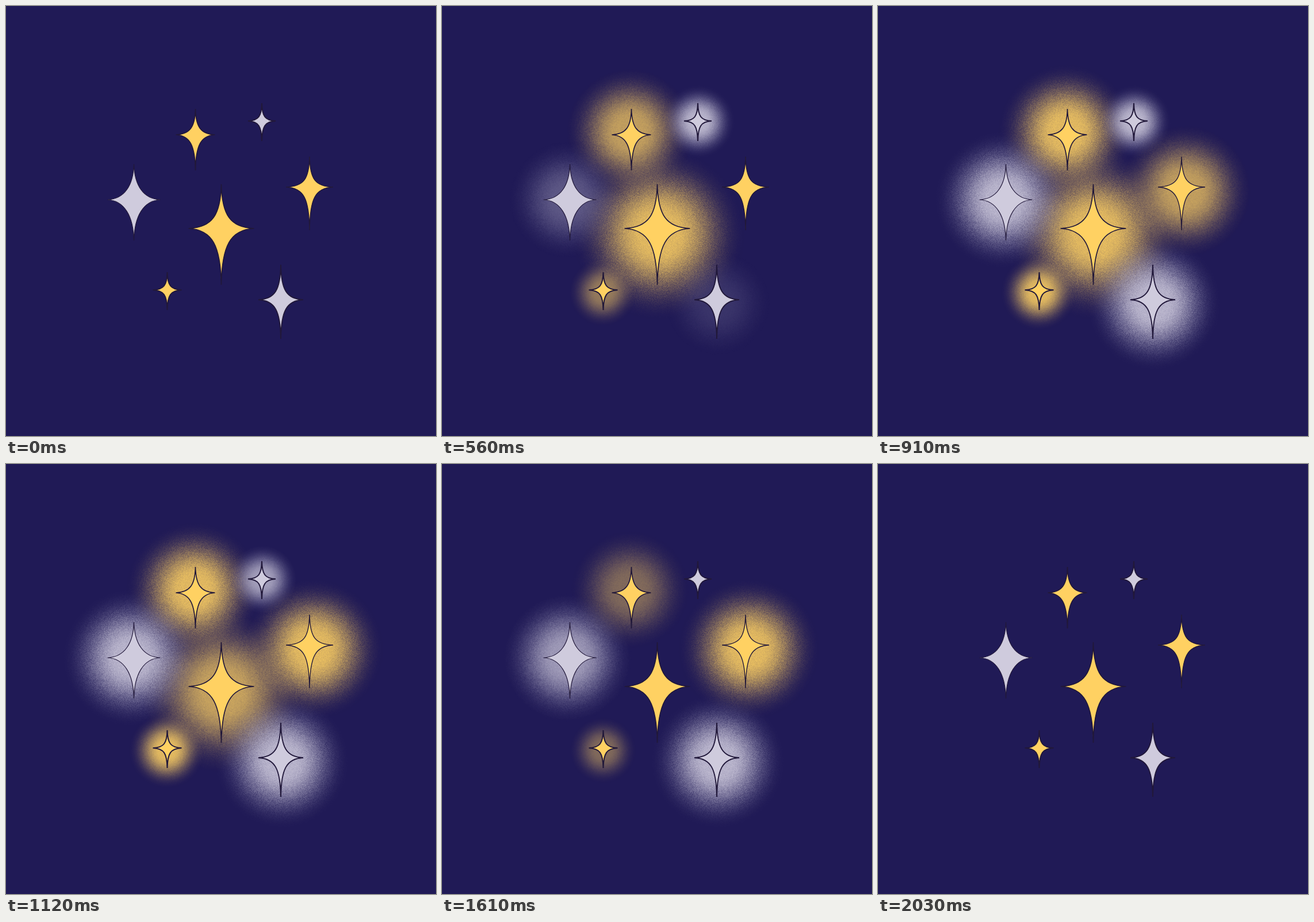
Write an HTML page with a canvas that moves like this. It is 748x748 px and loops after 2100 ms.

```html
<!DOCTYPE html>
<html lang="en">
<head>
<meta charset="utf-8">
<title>Glowing stars</title>
<style>
  html, body { margin: 0; width: 100%; height: 100%; overflow: hidden; background: #201a56; }
  canvas { display: block; width: 748px; height: 748px; }
</style>
</head>
<body>
<canvas id="stage" width="748" height="748"></canvas>
<script>
const ctx = document.getElementById('stage').getContext('2d');
const SIZE = 748, LOOP = 2100, STEP = 70;
const NIGHT = '#201a56';
const GOLD = [255, 209, 98], SILVER = [207, 203, 221];

// at: centre, arms: side / up / down, bulge: fullness of the body,
// glow: x / y / radius / grain, fade: in from, in to, out from, out to (ms)
const stars = [
  { at: [374.5, 387], arms: [57, 77, 98], bulge: 0.27, color: GOLD, ink: 1.7, glow: [377, 396, 158, 0.9], fade: [0, 350, 1050, 1540] },
  { at: [329.5, 224], arms: [34, 45, 62], bulge: 0.27, color: GOLD, ink: 1.7, glow: [327, 219, 124, 0.9], fade: [210, 630, 1400, 1820] },
  { at: [445, 200], arms: [24, 31, 35], bulge: 0.23, color: SILVER, ink: 2, glow: [446, 201, 68, 0.35], fade: [0, 350, 1050, 1540] },
  { at: [528, 315], arms: [41, 53, 75], bulge: 0.23, color: GOLD, ink: 1.4, glow: [534, 322, 129, 0.9], fade: [560, 980, 1610, 2030] },
  { at: [222.5, 337], arms: [46, 62, 71], bulge: 0.36, color: SILVER, ink: 1.2, glow: [218, 337, 127, 0.9], fade: [420, 770, 1540, 1960] },
  { at: [478, 511], arms: [39, 61, 68], bulge: 0.25, color: SILVER, ink: 1.9, glow: [480, 517, 124, 0.9], fade: [490, 910, 1610, 2030] },
  { at: [280.5, 494], arms: [25, 31, 35], bulge: 0.23, color: GOLD, ink: 2, glow: [280, 498, 70, 0.35], fade: [350, 700, 1400, 1820] }
];

const clamp = v => Math.min(1, Math.max(0, v));
const smooth = v => { v = clamp(v); return v * v * (3 - 2 * v); };

let seed = 7;
function random() {
  seed = (seed * 1664525 + 1013904223) % 4294967296;
  return seed / 4294967296;
}

// Soft round light with a grainy falloff
function makeGlow({ color, glow: [, , radius, grain] }) {
  const size = radius * 2;
  const canvas = document.createElement('canvas');
  canvas.width = canvas.height = size;
  const g = canvas.getContext('2d');
  const image = g.createImageData(size, size);
  for (let y = 0, i = 0; y < size; y++) {
    for (let x = 0; x < size; x++, i += 4) {
      const d = Math.hypot(x + 0.5 - radius, y + 0.5 - radius) / radius;
      const a = 0.86 * (1 - smooth((d - 0.18) / 0.82)) ** 1.4;
      const noisy = a + (random() - 0.5) * grain * a * (1 - a);
      image.data.set(color, i);
      image.data[i + 3] = 255 * noisy;
    }
  }
  g.putImageData(image, 0, 0);
  return canvas;
}

function makeStar({ at: [cx, cy], arms: [side, up, down], bulge }) {
  const path = new Path2D();
  const arm = (tipX, tipY, fromX, fromY) => {
    // One arm is always vertical and the other horizontal
    const w = tipX || fromX, h = tipY || fromY;
    const tall = [cx + 0.02 * w, cy + (bulge + 0.04) * h];
    const wide = [cx + bulge * w, cy + 0.02 * h];
    const controls = fromY ? [...tall, ...wide] : [...wide, ...tall];
    path.bezierCurveTo(...controls, cx + tipX, cy + tipY);
  };
  path.moveTo(cx, cy - up);
  arm(side, 0, 0, -up);
  arm(0, down, side, 0);
  arm(-side, 0, 0, down);
  arm(0, -up, -side, 0);
  path.closePath();
  return path;
}

for (const star of stars) {
  star.light = makeGlow(star);
  star.path = makeStar(star);
}

function level([inFrom, inTo, outFrom, outTo], t) {
  return Math.min(clamp((t - inFrom) / (inTo - inFrom)), clamp((outTo - t) / (outTo - outFrom)));
}

function draw(t) {
  ctx.globalAlpha = 1;
  ctx.fillStyle = NIGHT;
  ctx.fillRect(0, 0, SIZE, SIZE);

  for (const { glow: [x, y, radius], fade, light } of stars) {
    const k = level(fade, t);
    if (!k) continue;
    const r = radius * (0.8 + 0.2 * k);
    ctx.globalAlpha = k;
    ctx.drawImage(light, x - r, y - r, 2 * r, 2 * r);
  }

  ctx.globalAlpha = 1;
  ctx.strokeStyle = '#21183a';
  ctx.lineJoin = 'bevel';
  for (const { path, color, ink } of stars) {
    ctx.fillStyle = `rgb(${color})`;
    ctx.fill(path);
    ctx.lineWidth = ink;
    ctx.stroke(path);
  }
}

const start = performance.now();
let shown = -1;
function tick() {
  const t = (performance.now() - start) % LOOP;
  const step = Math.floor(t / STEP);
  if (step !== shown) {
    shown = step;
    draw(step * STEP);
  }
  requestAnimationFrame(tick);
}
tick();
</script>
</body>
</html>
```
